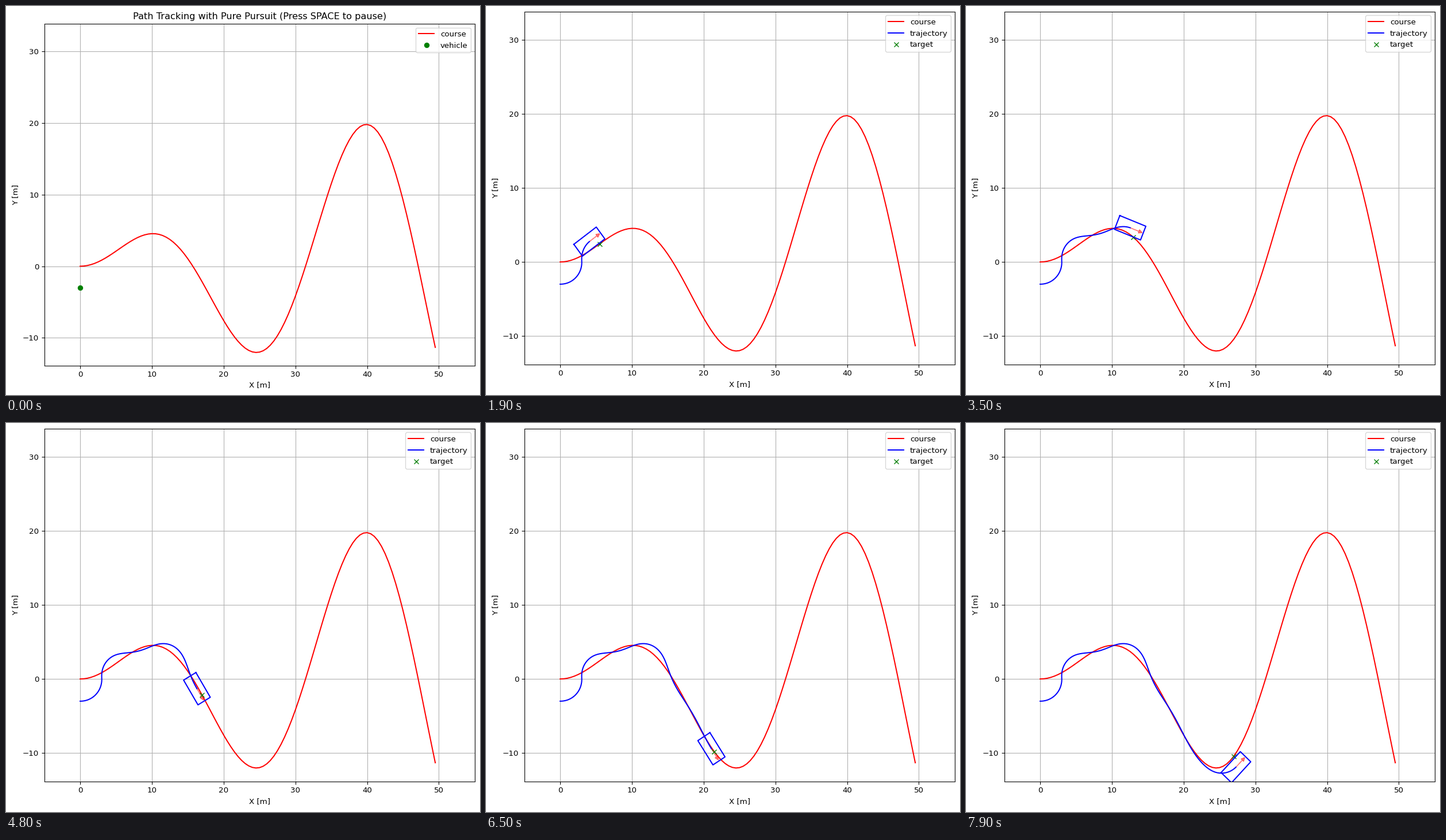
A matplotlib script that plays this animation: 825x678 px, repeating every 8 s.

```python
import math

import numpy as np
import matplotlib.pyplot as plt
from matplotlib.animation import FuncAnimation

W, H, DPI = 825, 678, 96.7
EPS = 1e-6                # keeps the pixel size from rounding down
FRAMES, INTERVAL = 80, 100
STEPS_PER_FRAME = 2

# Controller and vehicle
LOOK_GAIN, LOOK_MIN = 0.1, 2.0
SPEED_GAIN, SPEED = 1.0, 10 / 3.6
DT = 0.1
WHEELBASE = 2.9
LENGTH, WIDTH = WHEELBASE + 1, 2.0
MAX_STEER = math.pi / 4

# Axes in pixels
LEFT, AX_W = 66.6, 749.2
TITLED = (30.8, 595.8)    # top, height
PLAIN = (9.7, 615.1)
HALF_Y = 60 * TITLED[1] / AX_W / 2

cx = np.arange(0, 50, 0.5)
cy = np.sin(cx / 5) * cx / 2


def simulate(steps):
    """Pure pursuit run; returns rows of x, y, yaw and the target indices."""
    x, y, yaw, v = 0.0, -3.0, 0.0, 0.0
    poses, targets = [(x, y, yaw)], [0]
    near = target = 0
    for _ in range(steps):
        rx = x - WHEELBASE / 2 * math.cos(yaw)
        ry = y - WHEELBASE / 2 * math.sin(yaw)
        dist = np.hypot(cx - rx, cy - ry)
        while near + 1 < len(cx) and dist[near + 1] <= dist[near]:
            near += 1
        look = LOOK_GAIN * v + LOOK_MIN
        ahead = near
        while ahead + 1 < len(cx) and dist[ahead] < look:
            ahead += 1
        target = max(target, ahead)

        alpha = math.atan2(cy[target] - ry, cx[target] - rx) - yaw
        steer = math.atan(2 * WHEELBASE * math.sin(alpha) / look)
        steer = max(-MAX_STEER, min(MAX_STEER, steer))
        accel = SPEED_GAIN * (SPEED - v)

        x += v * math.cos(yaw) * DT
        y += v * math.sin(yaw) * DT
        yaw += v / WHEELBASE * math.tan(steer) * DT
        v += accel * DT
        poses.append((x, y, yaw))
        targets.append(target)
    return np.array(poses), targets


poses, targets = simulate(STEPS_PER_FRAME * (FRAMES - 1))

fig = plt.figure(figsize=((W + EPS) / DPI, (H + EPS) / DPI), dpi=DPI)
ax = fig.add_axes([0, 0, 1, 1])


def place(top, height):
    ax.set_position([LEFT / W, 1 - (top + height) / H, AX_W / W, height / H])


def draw_vehicle(x, y, yaw):
    c, s = math.cos(yaw), math.sin(yaw)
    u = np.array([-1, 1, 1, -1, -1]) * LENGTH / 2
    w = np.array([1, 1, -1, -1, 1]) * WIDTH / 2
    ax.plot(x + u * c - w * s, y + u * s + w * c, "-b")
    ax.arrow(x, y, LENGTH / 3 * c, LENGTH / 3 * s, head_width=WIDTH / 4,
             head_length=WIDTH / 4, fc="r", ec="r", alpha=0.5)


def update(frame):
    ax.clear()
    ax.plot(cx, cy, "-r", label="course")
    if frame == 0:
        place(*TITLED)
        ax.plot(poses[0, 0], poses[0, 1], "og", label="vehicle")
        ax.set_title("Path Tracking with Pure Pursuit (Press SPACE to pause)")
    else:
        place(*PLAIN)
        step = frame * STEPS_PER_FRAME
        goal = targets[step]
        ax.plot(poses[:step + 1, 0], poses[:step + 1, 1], "-b",
                label="trajectory")
        ax.plot(cx[goal], cy[goal], "xg", label="target")
        draw_vehicle(*poses[step])
    ax.set_xlim(-5, 55)
    ax.set_ylim(10 - HALF_Y, 10 + HALF_Y)
    ax.set_xticks(range(0, 51, 10))
    ax.set_yticks(range(-10, 31, 10))
    ax.set_xlabel("X [m]")
    ax.set_ylabel("Y [m]")
    ax.grid(True)
    ax.legend(loc="upper right")


anim = FuncAnimation(fig, update, frames=FRAMES, interval=INTERVAL,
                     repeat=True, repeat_delay=0)
plt.show()
```
